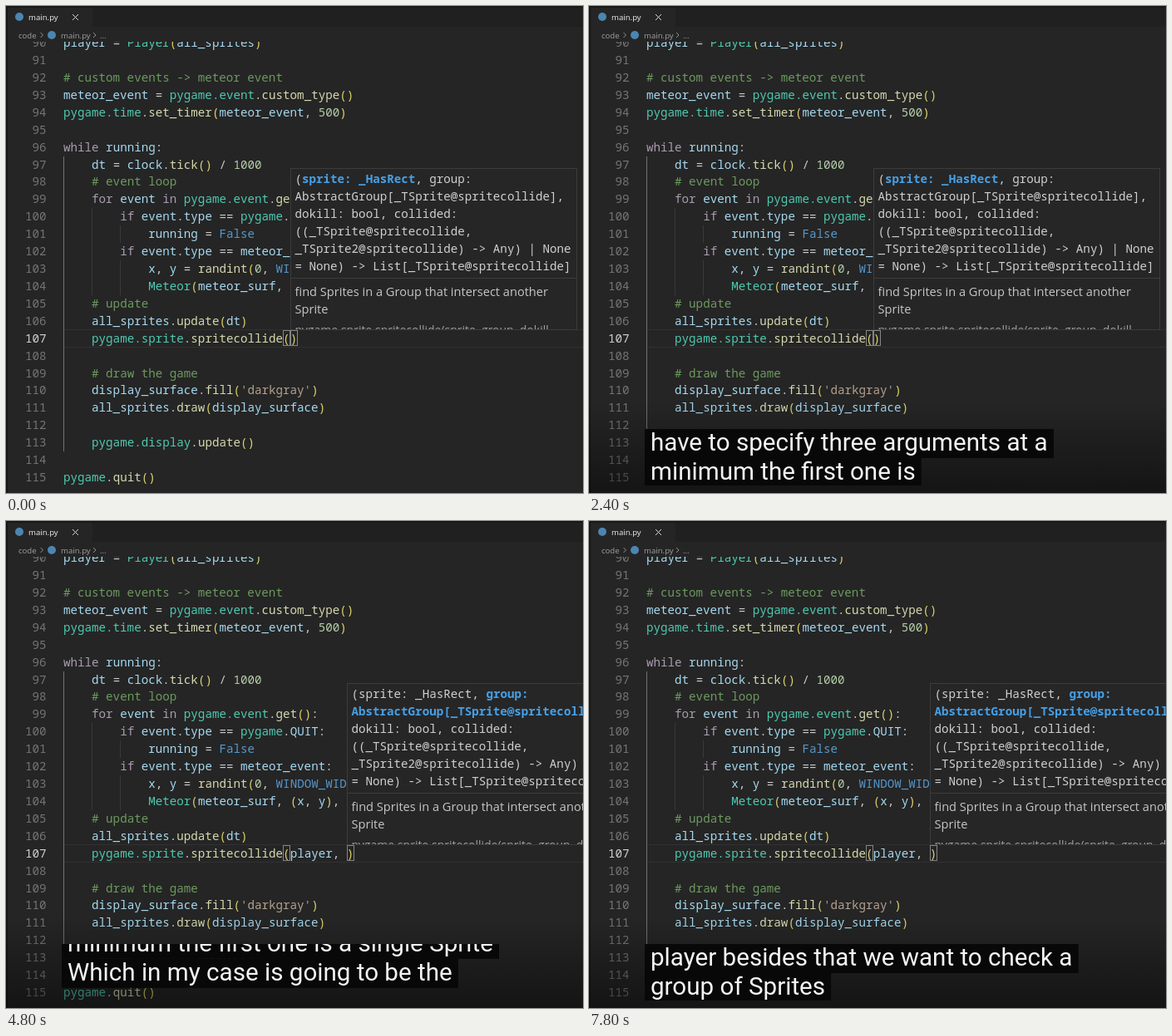
Animation, 694 px wide and 586 px high, one loop 8000 ms. Source, as an HTML page with a canvas:

```html
<!DOCTYPE html>
<html lang="en">
<head>
<meta charset="utf-8">
<title>Code editor with captions</title>
<style>
html, body { margin: 0; width: 100%; height: 100%; overflow: hidden; background: #252525; }
canvas { display: block; }
</style>
</head>
<body>
<canvas id="stage" width="694" height="586"></canvas>
<script>
const ctx = document.getElementById('stage').getContext('2d');
const W = 694, H = 586, LOOP = 8000;
const CHAR = 8.52, ROW = 20.92, LEFT = 69;
const MONO = '14.2px "Noto Sans Mono", monospace';
const BOLD = 'bold ' + MONO;
const SANS = '"Open Sans", sans-serif';
const CAPTION = '29.6px Roboto, sans-serif';
const BLUE = '#46a0e6';

const code = `player = Player(all_sprites)

# custom events -> meteor event
meteor_event = pygame.event.custom_type()
pygame.time.set_timer(meteor_event, 500)

while running:
    dt = clock.tick() / 1000
    # event loop
    for event in pygame.event.get():
        if event.type == pygame.QUIT:
            running = False
        if event.type == meteor_event:
            x, y = randint(0, WINDOW_WIDTH)
            Meteor(meteor_surf, (x, y),
    # update
    all_sprites.update(dt)
    pygame.sprite.spritecollide()

    # draw the game
    display_surface.fill('darkgray')
    all_sprites.draw(display_surface)

    pygame.display.update()

pygame.quit()`.split('\n');

// Each named group is a token kind.
const syntax = /(?<comment>#.*)|(?<string>'[^']*')|(?<keyword>\b(?:while|for|in|if)\b)|(?<constant>\b(?:False|WINDOW_WIDTH)\b)|(?<number>\b\d+)|(?<type>\bpygame(?:\.(?:event|time|sprite|display)(?=\.))?|\b(?:Meteor|Player)\b)|(?<call>\w+(?=\())|(?<name>\w+)|(?<bracket>[()])|(?<other>[^\s\w()]+)/g;
const colors = {
  comment: '#6c9a5f', string: '#b5a08e', keyword: '#aa9bb0', constant: '#5599cf',
  number: '#b5cea8', type: '#4ec9b0', call: '#d6d8ae', name: '#a6d9f0',
  bracket: '#ddd36a', other: '#cccccc'
};

const signature = [
  '(sprite: _HasRect, group:', 'AbstractGroup[_TSprite@spritecollide],',
  'dokill: bool, collided:', '((_TSprite@spritecollide,',
  '_TSprite2@spritecollide) -> Any) | None', '= None) -> List[_TSprite@spritecollide]'
];

const suggestions = [
  ['module', 'pygame'], ['keyword', 'pass'], ['variable', 'player'], ['function', 'pow'],
  ['function', 'print'], ['class', 'property'], ['class', 'PendingDeprecationWarning'],
  ['class', 'PermissionError'], ['class', 'Player'], ['class', 'ProcessLookupError'],
  ['variable', '__package__'], ['variable', '__path__']
];
const matches = [['variable', 'player'], ['class', 'Player']];

const typing = [[2700, 'p'], [3220, 'pl'], [3320, 'pla'], [3420, 'play'], [3520, 'playe'],
  [3620, 'player'], [4600, 'player,'], [4800, 'player, ']];

// Words appear evenly between the first and the last time.
const captions = [
  ['have to specify three arguments at a', 200, 1150],
  ['minimum the first one is a single Sprite', 1500, 2800],
  ['Which in my case is going to be the', 3380, 4450],
  ['player besides that we want to check a', 4950, 6750],
  ['group of Sprites', 7250, 7700]
].map(([line, start, end]) => ({ words: line.split(' '), start, end }));
const SCROLL_LEAD = 360, SCROLL_TIME = 430, CAPTION_ROW = 35;

function text(str, x, y, color, font = MONO, align = 'left') {
  ctx.font = font;
  ctx.fillStyle = color;
  ctx.textAlign = align;
  ctx.fillText(str, x, y);
}

function rect(x, y, w, h, color) {
  ctx.fillStyle = color;
  ctx.fillRect(x, y, w, h);
}

function frame(x, y, w, h, color) {
  ctx.strokeStyle = color;
  ctx.lineWidth = 1;
  ctx.strokeRect(Math.round(x) + .5, Math.round(y) + .5, w, h);
}

function dot(x, y, r, color) {
  ctx.fillStyle = color;
  ctx.beginPath();
  ctx.arc(x, y, r, 0, 7);
  ctx.fill();
}

function stroke(path, color, width = 1) {
  ctx.strokeStyle = color;
  ctx.lineWidth = width;
  ctx.stroke(new Path2D(path));
}

function clipped(x, y, w, h, draw) {
  ctx.save();
  ctx.beginPath();
  ctx.rect(x, y, w, h);
  ctx.clip();
  draw();
  ctx.restore();
}

const baseline = line => 70 + (line - 91) * ROW;

function drawHeader() {
  const font = '9.6px ' + SANS;
  rect(104, 2, W, 23, '#202020');
  rect(0, 0, W, 2, '#181818');
  dot(16, 13, 5, '#4b86b0');
  text('main.py', 27, 16.5, '#f0f0f0', font);
  stroke('M80 10l7 7m0-7l-7 7', '#d8d8d8');
  text('code', 15, 38.5, '#a0a0a0', font);
  dot(55, 35, 5, '#4b86b0');
  text('main.py', 66, 38.5, '#a0a0a0', font);
  text('...', 113, 38.5, '#a0a0a0', font);
  stroke('M41.500 32l3 3-3 3M105 32l3 3-3 3', '#909090');
}

function drawCode(typed) {
  frame(LEFT, 389, W, 21, '#313131');
  rect(LEFT, 181, 1, 355, '#727272');
  rect(103, 243, 1, 105, '#393939');
  rect(137, 264, 1, 21, '#393939');
  rect(137, 306, 1, 42, '#393939');
  clipped(0, 43, W, H, () => code.forEach((line, i) => {
    const number = 90 + i, y = baseline(number), current = number === 107;
    text(number, 48.5, y, current ? '#d0d0d0' : '#747474', MONO, 'right');
    if (current) line = line.replace('()', `(${typed})`);
    for (const m of line.matchAll(syntax)) {
      const kind = Object.keys(m.groups).find(k => m.groups[k] !== undefined);
      text(m[0], LEFT + m.index * CHAR, y, colors[kind]);
    }
  }));
  const open = LEFT + 31 * CHAR;
  for (const x of [open, open + (typed.length + 1) * CHAR]) frame(x, 390, 8, 18, '#858585');
}

function drawSignature(x, second) {
  const bottom = 389, width = 344, tx = x + 5.5;
  rect(x, 196, width, bottom - 196, '#262627');
  frame(x, 195, width, bottom - 195, '#3c3c3c');
  signature.forEach((line, i) => text(line, tx, 213 + i * ROW, '#cfcfcf'));
  const emphasize = (str, row, col) => {
    const sx = tx + col * CHAR, y = 213 + row * ROW;
    rect(sx, y - 13, str.length * CHAR, 18, '#262627');
    text(str, sx, y, BLUE, BOLD);
  };
  if (second) {
    emphasize('group:', 0, 19);
    emphasize(signature[1].slice(0, -1), 1, 0);
  } else {
    emphasize('sprite: _HasRect', 0, 1);
  }
  rect(x, 327, width, 1, '#3c3c3c');
  const font = '14.6px ' + SANS;
  text('find Sprites in a Group that intersect another', tx, 349, '#c6c6c6', font);
  text('Sprite', tx, 370, '#c6c6c6', font);
  clipped(x, 380, width, bottom - 380, () =>
    text('pygame.sprite.spritecollide(sprite, group, dokill', tx, 395, '#a0a0a0', '14px ' + SANS));
}

function drawIcon(kind, x, y) {
  ctx.save();
  ctx.translate(x, y);
  if (kind === 'module') text('{}', -6, 4, '#d8d8d8', '10px "Noto Sans Mono", monospace');
  if (kind === 'keyword') stroke('M-5-4h5m2 0h3M-5-1h10M-5 2h3m2 0h5M-5 5h7', '#c0c0c0');
  if (kind === 'variable') {
    stroke('M-3-4h-2v8h2M3-4h2v8h-2', '#c0c0c0');
    stroke('M-2 0l2-2 2 1-1 3-3-1z', '#75beff');
  }
  if (kind === 'function') stroke('M0-5l5 2v6l-5 3-5-3v-6zM-5-3l5 3 5-3M0 0v6', '#a99bb5');
  if (kind === 'class') stroke('M-5-2l3-3 3 3-3 3zM1-2h3M0 0v4h3M3-3l2 1-1 2-2-1zM3 3l2 1-1 2-2-1z', '#c3a276');
  ctx.restore();
}

function drawList(items, x, y, width, typed) {
  rect(x, y, width, items.length * ROW + 1, '#252526');
  rect(x, y, width, ROW, '#0b3c70');
  frame(x, y, width, Math.round(items.length * ROW), '#3f3f3f');
  items.forEach(([kind, label], i) => {
    const mid = y + (i + .5) * ROW, tx = x + 18;
    const start = label.toLowerCase().indexOf(typed), end = start + typed.length;
    drawIcon(kind, x + 8, mid);
    text(label.slice(0, start), tx, mid + 4.500, '#d0d0d0');
    text(label.slice(start, end), tx + start * CHAR, mid + 4.5, BLUE, BOLD);
    text(label.slice(end), tx + end * CHAR, mid + 4.5, i ? '#d0d0d0' : '#f0f0f0');
  });
}

function drawDetails() {
  rect(686, 108, 8, 281, '#252526');
  frame(686, 108, 20, 280, '#3f3f3f');
  rect(680, 157, 5, 182, '#434343');
  text('p', 689, 125, '#cfcfcf');
  rect(690, 146, 4, 1, '#606060');
  [...'Rngeygipgnl'].forEach((c, i) => text(c, 689, 171 + i * ROW, '#c6c6c6', '14.6px ' + SANS));
}

function drawCaptions(t) {
  let now = captions.length - 1;
  while (now > 0 && t < captions[now].start - SCROLL_LEAD) now--;
  const { start } = captions[now];
  const progress = now ? Math.min(1, (t - start + SCROLL_LEAD) / SCROLL_TIME) : 1;
  clipped(0, 509, W, H, () => {
    for (let k = Math.max(0, now - 2); k <= now; k++) {
      const { words, start, end } = captions[k];
      const step = (end - start) / (words.length - 1);
      const count = Math.floor((t - start) / step + 1.001);
      if (count < 1) continue;
      const line = words.slice(0, count).join(' ');
      const y = 570 + CAPTION_ROW * (k - now + 1 - progress);
      ctx.font = CAPTION;
      rect(67, y - 26, ctx.measureText(line).width + 14, k === now || progress < 1 ? 33 : 35, '#080808');
      if (k < now) rect(67, y - 26, ctx.measureText(line).width + 14, 35, '#080808');
      text(line, 74, y, '#f4f4f4', CAPTION);
    }
  });
}

function drawHand() {
  const hand = new Path2D('M553 578l-3-9q1-3 4 1v-8q1-3 3 0v-2q1-3 3 0v1q2-2 3 1v2q2-2 3 1v8l-3 6z');
  ctx.fillStyle = '#111';
  ctx.fill(hand);
  ctx.strokeStyle = '#f0f0f0';
  ctx.lineWidth = 1.3;
  ctx.stroke(hand);
  stroke('M557 562v7m3-7v7m3-6v6', '#f0f0f0');
}

function drawShade() {
  const shade = ctx.createLinearGradient(0, 475, 0, H);
  shade.addColorStop(0, 'rgba(0,0,0,0)');
  shade.addColorStop(1, 'rgba(0,0,0,.45)');
  rect(0, 475, W, H - 475, shade);
}

function draw(t) {
  const typed = typing.reduce((last, [time, value]) => t >= time ? value : last, '');
  const popupX = Math.round(341.5 + typed.length * CHAR);
  rect(0, 0, W, H, '#252525');
  drawHeader();
  drawCode(typed);
  if (typed === 'p') {
    drawList(suggestions, popupX + 1, 136, 335, typed);
    drawDetails();
  } else {
    drawSignature(popupX, typed.includes(','));
    if (typed && !typed.includes(',')) drawList(matches, popupX, 411, 335, typed);
  }
  rect(0, 0, 2, H, '#171717');
  if (t >= 200) drawShade();
  drawCaptions(t);
  if (t >= 1200 && t < 2200) drawHand();
}

const origin = performance.now();
function tick() {
  draw((performance.now() - origin) % LOOP);
  requestAnimationFrame(tick);
}
tick();
</script>
</body>
</html>
```
